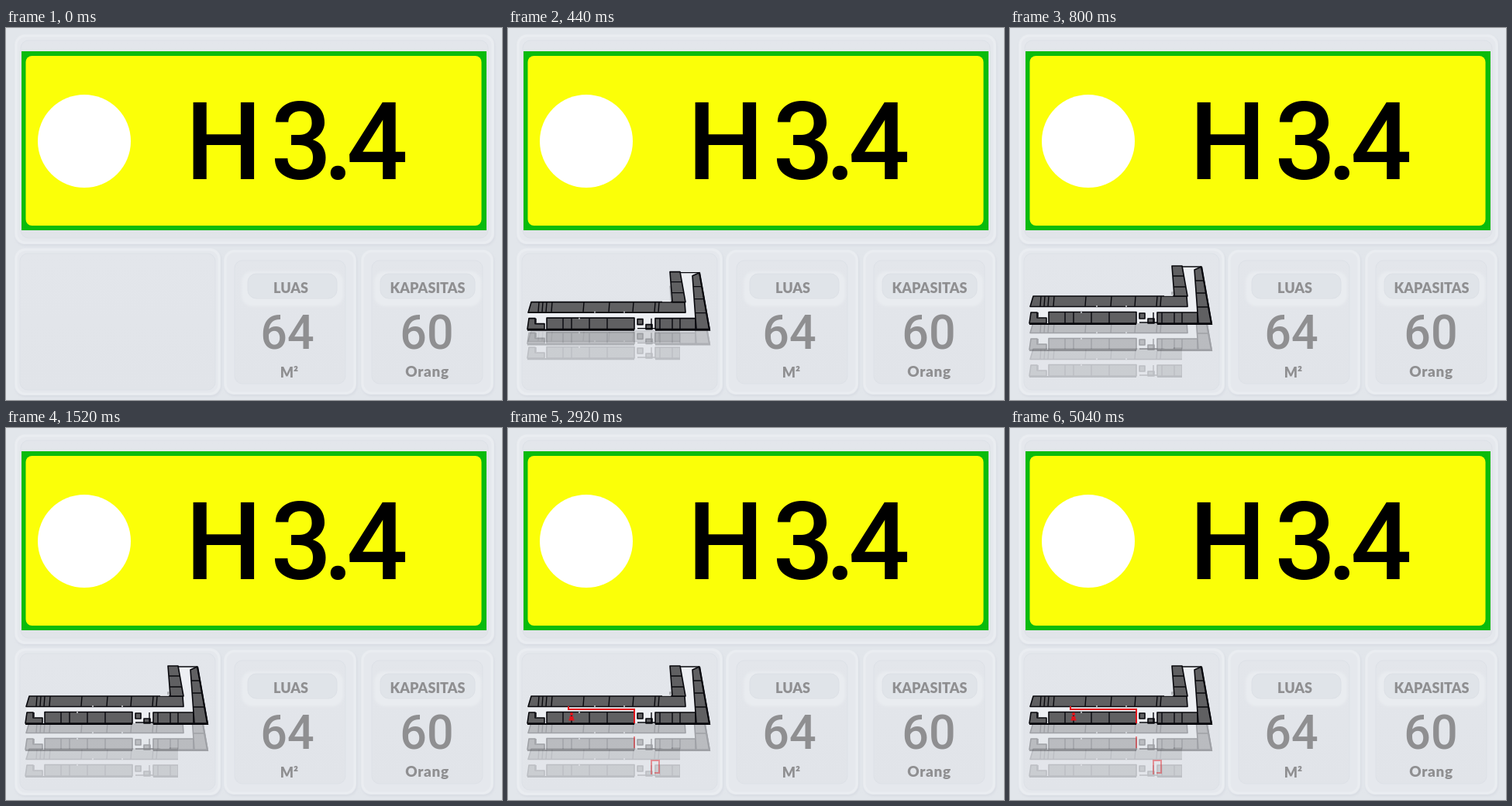
Animation, 640 px wide and 480 px high, one loop 5120 ms. Source, as an HTML page:

```html
<!DOCTYPE html>
<html lang="id">
<head>
<meta charset="utf-8">
<title>H 3.4</title>
<style>
html, body { margin: 0; width: 100%; height: 100%; overflow: hidden; background: #e2e6eb; }
svg { display: block; width: 640px; height: 480px; }
text { text-anchor: middle; fill: #8f8f91; }
.label { font: 900 18px Lato, sans-serif; }
.unit { font-size: 19px; letter-spacing: .6px; }
.value { font: 500 61px Roboto, sans-serif; }
.room { font: 500 139px Roboto, sans-serif; fill: #000; }
.route { fill: none; stroke: #e3151c; stroke-width: 2; stroke-dasharray: 1 2; }
</style>
</head>
<body>
<svg viewBox="0 0 640 480">
  <defs>
    <linearGradient id="face" x2="0" y2="1">
      <stop offset="0" stop-color="#e3e6eb"/>
      <stop offset="1" stop-color="#e1e4e9"/>
    </linearGradient>
    <filter id="soft" x="-10%" y="-10%" width="120%" height="120%"><feGaussianBlur stdDeviation="1.5"/></filter>
    <clipPath id="short"><path d="M18 344H222V390H18Z"/></clipPath>
    <g id="plan"></g>
  </defs>
  <rect width="640" height="480" fill="#e2e6eb"/>
  <g id="cards"></g>

  <rect x="20" y="30" width="600" height="231" fill="#0abb0c"/>
  <rect x="25.500" y="36" width="588" height="219" rx="8" fill="#fbff08"/>
  <circle cx="101" cy="146" r="60" fill="#fff"/>
  <text class="room" x="281 333 381 429 479" y="195">H 3.4</text>

  <text class="label" x="367.5" y="341.500">LUAS</text>
  <text class="value" x="363" y="414">64</text>
  <text class="label" x="365.500" y="451">M²</text>
  <text class="label" x="544" y="341.500">KAPASITAS</text>
  <text class="value" x="543" y="414">60</text>
  <text class="label unit" x="543.500" y="450">Orang</text>

  <g id="building">
    <g id="low">
      <g opacity=".17" clip-path="url(#short)"><use href="#plan"/></g>
      <path class="route" opacity=".42" pathLength="1" d="M185 379V361H195V377H189"/>
    </g>
    <g id="mid">
      <use id="ghost" href="#plan"/>
      <path class="route" opacity=".5" pathLength="1" d="M163 379V364"/>
    </g>
    <g id="top">
      <use href="#plan"/>
      <path class="route" pathLength="1" d="M163 381V363H78V359"/>
      <g id="pin" fill="#e3151c">
        <circle cx="82" cy="369" r="2"/>
        <path d="M79.500 372H84.500V376H79.500ZM78.500 375.500H85.500V377.500H78.500Z"/>
      </g>
    </g>
  </g>
</svg>
<script>
const $ = id => document.getElementById(id);
const clamp = v => Math.max(0, Math.min(1, v));
const span = (t, a, b) => clamp((t - a) / (b - a));

const box = (x, y, w, h, r, attrs) =>
  `<rect x="${x}" y="${y}" width="${w}" height="${h}" rx="${r}" ${attrs}/>`;

// Raised panel: soft shade, light rim, flat face
function card(x, y, w, h, rim) {
  return box(x + 1, y + 2, w, h, 13, 'fill="#d8dce3" filter="url(#soft)"') +
    box(x, y, w, h, 13, 'fill="#e5e8ed"') +
    box(x + 2, y + 2, w - 4, h - 4, 12, 'fill="none" stroke="#eaedf1" stroke-width="3"') +
    box(x + rim, y + rim, w - 2 * rim, h - 2 * rim, 10, 'fill="url(#face)" stroke="#dde1e7"');
}

function pill(x, w) {
  return box(x, 314, w, 45, 14, 'fill="#e9ecf0" filter="url(#soft)"') +
    box(x + 8, 317, w - 16, 32, 11, 'fill="#e0e4e9" stroke="#dce0e6"');
}

$('cards').innerHTML = card(11, 8, 619, 271, 8) + card(11, 284, 266, 190, 7) +
  card(281, 286, 171, 187, 14) + card(458, 286, 171, 187, 14) +
  pill(304, 131) + pill(475, 138);

// Floor plan: white corridor, two bands of rooms and a wing
const walls = (xs, y1, y2, lean) =>
  xs.map(x => `M${x} ${y1}L${x - lean} ${y2}`).join('');

$('plan').innerHTML = `
  <path fill="#edeff3" d="M29 346H211L209 307H246L260 381H25L26 362Z"/>
  <g fill="#606062" stroke="#08080d" stroke-width="1.600" stroke-linejoin="round">
    <path d="M30 346H228L229 359.500H26Z"/>
    <path d="M50 366.500H163V381H50ZM190 367H242V381H190Z"/>
    <path d="M27 367H35V374H47V381H25Z"/>
    <path d="M209 307H222L229 346H212Z"/>
    <path d="M238 312L247 308L260 381H243Z"/>
    <path d="M167 368H174V375H167ZM178 375H186V381H178Z"/>
  </g>
  <g fill="none" stroke="#08080d" stroke-width="1.400">
    <path d="${walls([40, 45, 50, 57, 98, 131, 162, 190, 195], 346, 359, 1)}"/>
    <path d="${walls([71, 82, 105, 128, 185, 196, 212, 222], 367, 381, 0)}"/>
    <path d="M210 320H225M211 334H227M239 326H249M240 342H252M242 360H256M222 308H247M167 380H190M36 367V373"/>
    <path stroke-width="2.200" d="M25 382H163M190 382H260L247 308"/>
  </g>
  <path fill="none" stroke="#edeff3" stroke-width="1.300" d="M112 360V358M150 360V358M199 345H210M92 366V368M228 322V328M238 348V353"/>`;

const routes = ['low', 'mid', 'top'].map(id => $(id).querySelector('.route'));
const times = [[1720, 1860], [1860, 1960], [1960, 2200]];
const LOOP = 5120, STEP = 40;

function draw(ms) {
  const t = Math.floor((ms % LOOP) / STEP) * STEP;
  const p = span(t, 0, 800);
  const lift = (id, y) => $(id).setAttribute('transform', `translate(0 ${y})`);
  lift('top', 17 - 17 * p);
  lift('mid', 17 + 17 * p);
  lift('low', 17 + 51 * p);
  $('ghost').setAttribute('opacity', 0.16 + 0.14 * p);
  $('building').setAttribute('opacity', span(t, 0, 200));

  routes.forEach((r, i) => {
    const k = span(t, ...times[i]);
    r.setAttribute('stroke-dashoffset', 1 - k);
    r.setAttribute('visibility', k > 0 ? 'visible' : 'hidden');
  });
  routes[2].setAttribute('opacity', 0.75 + 0.25 * span(t, 2200, 2500));
  $('pin').setAttribute('opacity', span(t, 2280, 2800));
}

const start = performance.now();
function tick() {
  draw(performance.now() - start);
  requestAnimationFrame(tick);
}
draw(0);
requestAnimationFrame(tick);
</script>
</body>
</html>
```
